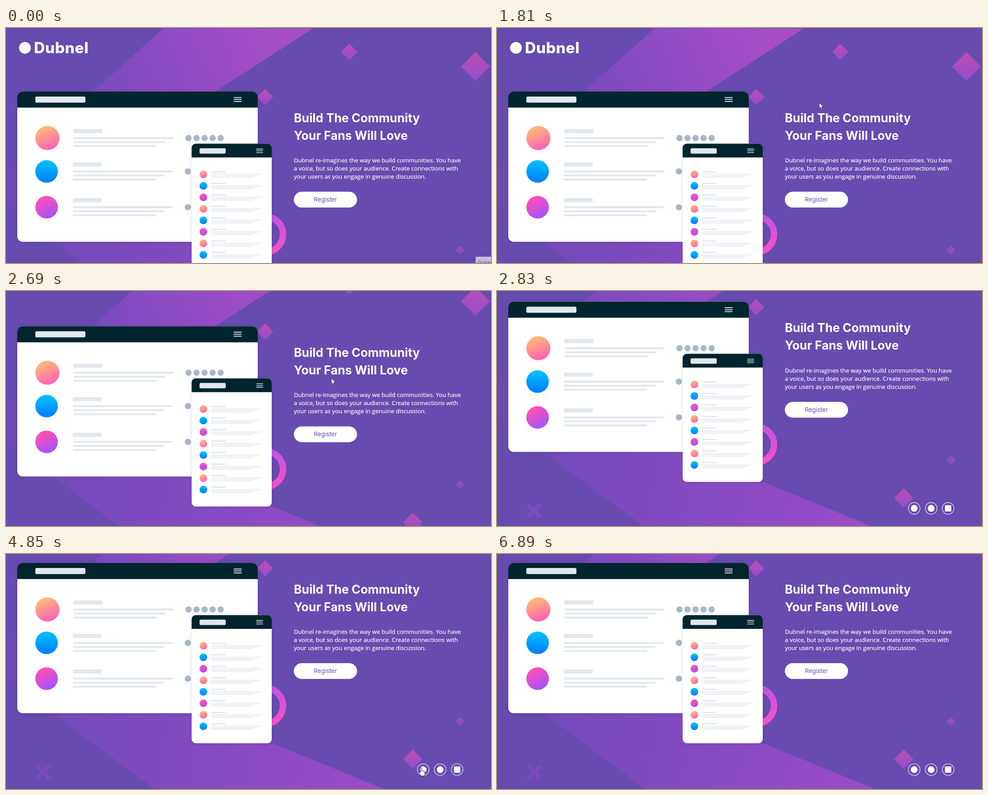
Animation of 1075x521 px, one loop 7.07 s. Source, as an HTML page:

```html
<!DOCTYPE html>
<html lang="en">
<head>
<meta charset="utf-8">
<title>Community landing page</title>
<style>
  html, body { margin: 0; width: 100%; height: 100%; overflow: hidden; background: #674baf; }
  svg { display: block; width: 100%; height: 100%; }
  text { fill: #fff; }
  .brand { font: 800 33.5px Inter, sans-serif; letter-spacing: .6px; }
  .title { font: 700 26.6px Inter, sans-serif; }
  .copy { font: 400 13.1px "Open Sans", sans-serif; stroke: #fff; stroke-width: .2px; }
  .label { font: 400 13.2px Inter, sans-serif; text-anchor: middle; }
  .tip { font: 400 10px "Open Sans", sans-serif; fill: #4c4a58; }
  .card { filter: drop-shadow(0 1px 3px rgba(30, 10, 70, .18)); }
</style>
</head>
<body>
<svg viewBox="0 0 1075 521" preserveAspectRatio="none">
  <defs>
    <linearGradient id="bandTop" gradientUnits="userSpaceOnUse" x1="215" y1="160" x2="580" y2="-15">
      <stop stop-color="#7b4bc0"/><stop offset="1" stop-color="#a64dc5"/>
    </linearGradient>
    <linearGradient id="bandLow" gradientUnits="userSpaceOnUse" x1="0" y1="500" x2="840" y2="640">
      <stop stop-color="#6b4bb2"/><stop offset=".2" stop-color="#774abb"/><stop offset="1" stop-color="#9a4cc8"/>
    </linearGradient>
    <linearGradient id="gem" x1="0" y1="0" x2="0" y2="1">
      <stop stop-color="#bb4cb2"/><stop offset="1" stop-color="#944ecb"/>
    </linearGradient>
    <linearGradient id="ring" x1="0" y1="0" x2="0" y2="1">
      <stop stop-color="#c653e6"/><stop offset="1" stop-color="#f950c6"/>
    </linearGradient>
    <linearGradient id="peach" x1=".3" y1="0" x2=".7" y2="1">
      <stop offset=".1" stop-color="#ffb679"/><stop offset=".9" stop-color="#ff66b2"/>
    </linearGradient>
    <linearGradient id="blue" x1="0" y1="0" x2="0" y2="1">
      <stop offset=".1" stop-color="#00bcff"/><stop offset=".9" stop-color="#0082ff"/>
    </linearGradient>
    <linearGradient id="pink" x1=".25" y1="0" x2=".75" y2="1">
      <stop offset=".1" stop-color="#ff4fb5"/><stop offset=".9" stop-color="#a852f8"/>
    </linearGradient>
  </defs>
  <rect width="1075" height="521" fill="#674baf"/>
  <g id="page">
    <path fill="url(#bandLow)" d="M192 141L18 296Q4 309 4 325V385Q4 400 18 411L329 642H838L400 463V141Z"/>
    <path fill="url(#bandTop)" d="M349 1H680L448 151H181Z"/>
    <g id="gems"></g>
    <path d="M70.500 593.500l23 23m0-23l-23 23" stroke="#7d4bbb" stroke-width="9" stroke-linecap="round"/>
    <circle cx="574.500" cy="457.500" r="39.500" fill="none" stroke="url(#ring)" stroke-width="14"/>
    <circle cx="42" cy="44" r="13" fill="#fff"/>
    <text class="brand" x="62" y="56">Dubnel</text>
    <g id="cards"></g>
    <text class="title" x="638" y="208.500">Build The Community</text>
    <text class="title" x="638" y="247.500">Your Fans Will Love</text>
    <g class="copy">
      <text x="638" y="298">Dubnel re-imagines the way we build communities. You have</text>
      <text x="638" y="316">a voice, but so does your audience. Create connections with</text>
      <text x="638" y="334">your users as you engage in genuine discussion.</text>
    </g>
    <rect x="638" y="363" width="140" height="35" rx="17.500" fill="#fff"/>
    <text class="label" x="708" y="385" style="fill:#674baf">Register</text>
    <g class="lit">
      <rect x="638" y="363" width="140" height="35" rx="17.500" fill="#e78ae8"/>
      <text class="label" x="708" y="385">Register</text>
    </g>
    <g id="social"></g>
  </g>
  <g id="tooltip">
    <rect x="1041" y="507" width="34" height="14" fill="#c6bfdd"/>
    <text class="tip" x="1045.500" y="523">Gravar</text>
  </g>
  <g id="cursor">
    <path id="arrow" d="M0 0V13.500L3 10.700L5.200 15.700L7.500 14.700L5.300 9.800H9.300Z" fill="#fff" stroke="#15131c" stroke-width=".9"/>
    <path id="beam" d="M-3-6h2l1 1 1-1h2M0-5V5M-3 6h2l1-1 1 1h2" fill="none" stroke="#9d95b5"/>
    <path id="hand" d="M-1.500 10V1.200a1.500 1.500 0 0 1 3 0V6.500a1.400 1.400 0 0 1 2.600.5a1.300 1.300 0 0 1 2.400.6a1.200 1.200 0 0 1 2 .9V12q0 3-1.800 5.500H0Q-2.500 14-5 11a1.400 1.400 0 0 1 2-1.800z" fill="#fff" stroke="#15131c" stroke-width=".9"/>
  </g>
</svg>
<script>
const LOOP = 7070;
const ACCENT = '#e78ae8', LINE = '#e2e8ed';
const $ = id => document.getElementById(id);
const times = (n, make) => Array.from({ length: n }, (_, i) => make(i)).join('');
const tints = ['peach', 'blue', 'pink'];

const rect = (x, y, w, h, r, fill) =>
  `<rect x="${x}" y="${y}" width="${w}" height="${h}" rx="${r}" fill="${fill}"/>`;
const disc = (x, y, r, fill) => `<circle cx="${x}" cy="${y}" r="${r}" fill="${fill}"/>`;
const gem = (x, y, r, opacity = 1) =>
  `<path opacity="${opacity}" fill="url(#gem)" stroke="url(#gem)" stroke-width="3" stroke-linejoin="round"
    d="M${x} ${y - r + 2}L${x + r - 2} ${y}L${x} ${y + r - 2}L${x - r + 2} ${y}Z"/>`;
const menu = (x, y, w, gap, h) => times(3, i => rect(x, y + i * gap, w, h, h / 2, '#ddd9e4'));
const panel = (x, y, w, h, r, head) =>
  `<g class="card">${rect(x, y, w, h, r, '#fff')}</g>
   <path fill="#00252e" d="M${x} ${y + head}V${y + r}a${r} ${r} 0 0 1 ${r} ${-r}H${x + w - r}a${r} ${r} 0 0 1 ${r} ${r}V${y + head}Z"/>`;

// List row: avatar, name bar and three lines, each shorter than the last.
const entry = (y, r, tint, x, dots) =>
  disc(65 + r, y, r, `url(#${tint})`) + rect(x, y - 20, 64, 9, 1, LINE) +
  times(3, i => rect(x, y - 2 + i * 8.9, 222 - i * 18.5, 4.2, 2.1, LINE)) +
  times(dots, i => disc(x + 255 + i * 17.8, y, 6.9, '#a7b7c6'));
const smallEntry = i => {
  const y = 324.5 + i * 25.5;
  return disc(437.5, y, 8.5, `url(#${tints[i % 3]})`) + rect(454.5, y - 6.8, 32.5, 2.8, .8, LINE) +
    times(3, k => rect(454.5, y - .9 + k * 3.1, 111 - k * 9.2, 1.5, .7, LINE));
};

$('gems').innerHTML = gem(761, 53, 18) + gem(1040.5, 85.5, 32) + gem(574.5, 153, 18) +
  gem(1006, 492.5, 10, .7) + gem(901.5, 576, 21.5);

$('cards').innerHTML =
  panel(25, 141, 533, 333, 12, 35.5) + rect(65, 152, 111, 13.5, 3, '#e0e8ee') + menu(504.5, 153.2, 18, 4.4, 2) +
  entry(244, 26.7, 'peach', 149.5, 5) + entry(318, 25, 'blue', 148, 1) + entry(397.3, 25, 'pink', 148, 1) +
  panel(411.5, 256.5, 177.5, 284, 9, 30.5) + rect(429, 266.5, 58, 12, 3, '#e0e8ee') + menu(554.5, 267.6, 15.5, 3.9, 1.6) +
  times(8, smallEntry);

const badgeX = i => 924.7 + i * 37.6;
const badge = (i, color) =>
  `<circle cx="${badgeX(i)}" cy="599" r="13" fill="none" stroke="${color}" stroke-width="1.1"/>` +
  (i < 2 ? disc(badgeX(i), 599, 7.5, color) : rect(badgeX(i) - 7, 592, 14, 14, 0, color));
$('social').innerHTML = times(3, i => badge(i, '#fff') + `<g class="lit">${badge(i, ACCENT)}</g>`);
const lit = document.querySelectorAll('.lit');

// Pointer stops: time, x, y
const stops = [[610, 986, 48], [980, 714, 84], [1500, 706, 205], [1810, 714, 165], [2690, 721, 193],
  [2830, 722, 198], [3400, 725, 264.5], [3700, 725, 264.5], [4130, 756, 386], [4850, 920, 474.5],
  [5350, 922, 475], [5600, 960, 476], [6000, 1000, 477], [6400, 1000, 477], [6820, 1030, 512]];

const clamp = v => Math.min(1, Math.max(0, v));
const smooth = p => p * p * (3 - 2 * p);

function pointer(t) {
  const n = Math.max(1, stops.findIndex(s => s[0] > t));
  const [[t0, x0, y0], [t1, x1, y1]] = [stops[n - 1], stops[n]];
  const p = smooth(clamp((t - t0) / (t1 - t0)));
  return [x0 + (x1 - x0) * p, y0 + (y1 - y0) * p];
}

// One wheel turn with a cubic ease-out, redrawn every 70 ms.
function scrollTop(t) {
  const held = Math.floor((t - 30) / 70) * 70 + 30;
  return 121 * (1 - (1 - clamp((held - 2625) / 300)) ** 3);
}

const inside = (x, y, left, top, right, bottom) => x > left && x < right && y > top && y < bottom;
const shown = t => t >= stops[0][0] && t < stops.at(-1)[0];

// Index of the link under the pointer (0 is the button), 'text', or null.
function target(t) {
  if (!shown(t)) return null;
  const [x, screenY] = pointer(t);
  const y = screenY + scrollTop(t);
  if (inside(x, y, 638, 363, 778, 398)) return 0;
  for (let i = 0; i < 3; i++) if (Math.hypot(x - badgeX(i), y - 599) < 8) return i + 1;
  return inside(x, y, 638, 182, 922, 250) || inside(x, y, 638, 286, 1006, 338) ? 'text' : null;
}

function draw(t) {
  $('page').setAttribute('transform', `translate(0 ${-scrollTop(t)})`);
  $('tooltip').style.display = t < 70 ? '' : 'none';

  // Hover colour follows how long the link was pointed at lately.
  const recent = Array.from({ length: 20 }, (_, i) => target(t - i * 20));
  lit.forEach((g, i) => g.style.opacity = (recent.filter(hit => hit === i).length / 20) ** 2);

  $('cursor').setAttribute('transform', `translate(${pointer(t)})`);
  const hit = target(t);
  const kind = !shown(t) ? '' : hit === null ? 'arrow' : hit === 'text' ? 'beam' : 'hand';
  for (const id of ['arrow', 'beam', 'hand']) $(id).style.display = id === kind ? '' : 'none';
}

const start = performance.now();
function tick() {
  draw((performance.now() - start) % LOOP);
  requestAnimationFrame(tick);
}
tick();
</script>
</body>
</html>
```
